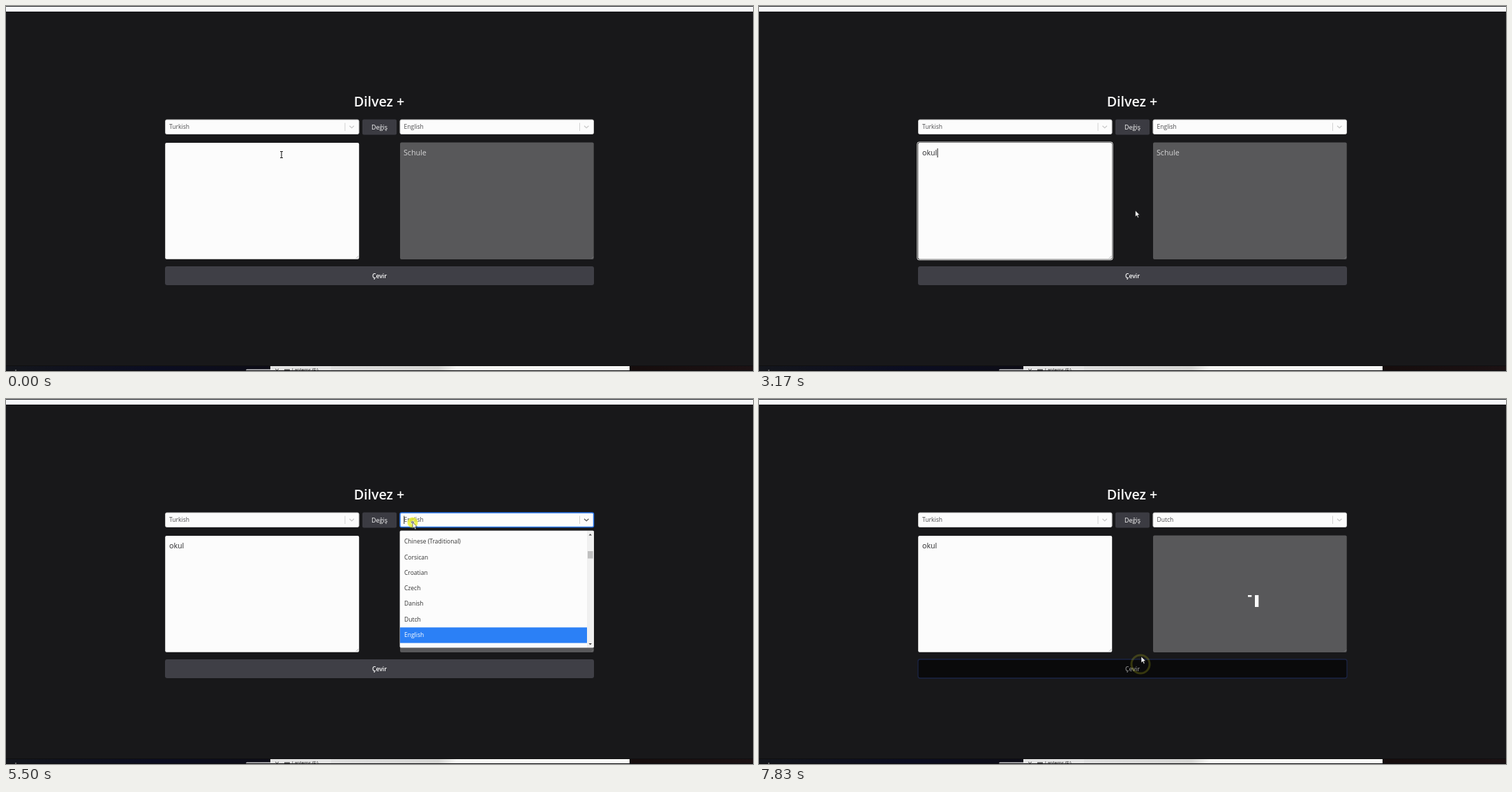
Write an HTML page that moves like this. It is 1071x523 px and loops after 8 s.

```html
<!DOCTYPE html>
<html lang="tr">
<head>
<meta charset="utf-8">
<title>Dilvez +</title>
<style>
html, body { margin: 0; width: 100%; height: 100%; overflow: hidden; background: #18181a; }
svg { display: block; width: 100%; height: 100%; }
text { font-family: "Open Sans", "Noto Sans", sans-serif; white-space: pre; }
.ui { font-size: 8.5px; fill: #4a4a4c; }
.area { font-size: 10.7px; }
.label { font-weight: 600; font-size: 8.6px; fill: #fff; text-anchor: middle; }
.chevron { fill: none; stroke: #c8c8c8; stroke-width: 1.2; }
</style>
</head>
<body>
<svg viewBox="0 0 1071 523" preserveAspectRatio="none">
  <defs>
    <linearGradient id="taskbar">
      <stop offset="0" stop-color="#14161c"/><stop offset=".2" stop-color="#0b0d22"/>
      <stop offset=".33" stop-color="#0d0d18"/><stop offset=".84" stop-color="#160d0d"/>
      <stop offset="1" stop-color="#1c1214"/>
    </linearGradient>
    <linearGradient id="panel">
      <stop offset="0" stop-color="#dedede"/><stop offset=".36" stop-color="#d6d6d4"/>
      <stop offset=".42" stop-color="#f6f6f4"/><stop offset="1" stop-color="#fafaf8"/>
    </linearGradient>
  </defs>

  <rect width="1071" height="523" fill="#18181a"/>
  <rect width="1071" height="1" fill="#26282c"/>
  <rect y="1" width="1071" height="7" fill="#f7f8fb"/>

  <rect y="515" width="1071" height="1" fill="#101011"/>
  <rect y="516" width="1071" height="7" fill="url(#taskbar)"/>
  <rect x="344" y="520.5" width="36" height="3" rx="1.5" fill="#c9c9cb"/>
  <rect x="379" y="516" width="87" height="6" fill="#e4e4e4"/>
  <rect x="466" y="516" width="428" height="6" fill="url(#panel)"/>
  <path d="M386 520l2.5 2 2.5-2" fill="none" stroke="#444"/>
  <rect x="399" y="520.5" width="8" height="2" fill="#555"/>
  <text x="410" y="524" font-size="6.6" fill="#222">Lanterns (F:)</text>
  <rect y="522" width="1071" height="1" fill="#0d0d10"/>
  <circle cx="14" cy="522" r="1" fill="#777"/>

  <text x="535" y="144" font-size="19.6" font-weight="600" fill="#fafafa" text-anchor="middle">Dilvez +</text>

  <g id="selects"></g>
  <rect id="swap" x="511" y="162.5" width="49" height="22" rx="2"/>
  <text class="label" x="535.5" y="177" style="font-weight:500;font-size:8.9px">Değiş</text>

  <rect id="areaRing" x="226.9" y="195" width="280.2" height="168.8" rx="2.5" fill="#111" stroke="#f4f4f4" stroke-width="1"/>
  <rect x="228.2" y="196" width="278" height="166.8" rx="2" fill="#fcfcfc"/>
  <path d="M502 361.5l3.5-3.5m-1 3.5l1-1" stroke="#999" stroke-width=".7"/>
  <text id="typed" class="area" x="234" y="214" fill="#2a2a2c"></text>
  <rect id="areaCaret" y="204" width="1" height="13" fill="#222"/>

  <rect x="565" y="195.6" width="277.7" height="167.4" rx="2" fill="#58585a"/>
  <path d="M840 361.5l2-2" stroke="#888" stroke-width=".7"/>
  <text id="result" class="area" x="570" y="214" fill="#d4d4d5"></text>
  <g id="loader" fill="#fbfbfb"></g>

  <rect id="submit" x="228" y="373" width="615" height="27" rx="3"/>
  <text id="submitText" class="label" x="535.5" y="389.5">Çevir</text>

  <g id="menu">
    <rect x="564.5" y="188.5" width="278.5" height="168" rx="2" fill="#d0d0d0"/>
    <rect x="565" y="189" width="277.5" height="167" rx="2" fill="#fcfcfc"/>
    <g id="options"></g>
    <rect x="833" y="189" width="9.5" height="167" fill="#f0f0f0"/>
    <rect x="834" y="218" width="7.6" height="10.5" fill="#c0c0c0"/>
    <path d="M835.5 195.4h4.4l-2.2-2.4zM835.5 350h4.4l-2.2 2.4z" fill="#444"/>
  </g>

  <circle id="pulse" fill="none" stroke="#e8ec1c"/>
  <g id="pointer">
    <path id="beam" d="M-2 -4.5h1.5l.5.6.5-.6h1.5M0 -4v8M-2 4.5h1.5l.5-.6.5.6h1.5" fill="none" stroke="#222" stroke-width="1.1"/>
    <path id="arrow" d="M0 0V9L2.1 7.1 3.6 10.4 5 9.8 3.6 6.6H6.4Z" fill="#fff" stroke="#111" stroke-width=".6"/>
    <path id="hand" d="M-1.5 1Q-.3 -.9 .9 1V4.3L5.2 5.5Q6.1 6 5.9 8L4.9 12.3H-.6L-4 7.8Q-3.6 6.2 -1.5 7.8Z" fill="#fff" stroke="#222" stroke-width=".6"/>
  </g>
</svg>

<script>
const NS = "http://www.w3.org/2000/svg";
const FPS = 6, LOOP = 8000;
const $ = id => document.getElementById(id);

function add(parent, tag, attrs, text) {
  const el = document.createElementNS(NS, tag);
  set(el, attrs);
  if (text) el.textContent = text;
  parent.appendChild(el);
  return el;
}
function set(el, attrs) {
  for (const k in attrs) el.setAttribute(k, attrs[k]);
}
const show = (el, on) => set(el, { visibility: on ? "visible" : "hidden" });
const within = (n, a, b) => n >= a && n <= b;

function makeSelect(x) {
  const g = $("selects");
  const box = add(g, "rect", { x, y: 163, width: 277.5, height: 20.5, rx: 2, fill: "#fcfcfc", stroke: "#ccc" });
  const value = add(g, "text", { x: x + 5.6, y: 176.3, class: "ui" });
  add(g, "rect", { x: x + 257, y: 167.5, width: 1, height: 11.5, fill: "#d2d2d2" });
  const chevron = add(g, "path", { d: `M${x + 264} 171.7l3.2 3 3.2-3`, class: "chevron" });
  return { box, value, chevron };
}
const from = makeSelect(228.5);
const to = makeSelect(565);
const toCaret = add($("selects"), "rect", { x: 570.3, y: 167.5, width: 1, height: 11.5, fill: "#333" });
from.value.textContent = "Turkish";

const ROW = 22.3, TOP = 193;
const options = ["Chinese (Traditional)", "Corsican", "Croatian", "Czech", "Danish", "Dutch", "English"]
  .map((name, i) => {
    const y = TOP + ROW * i;
    const row = add($("options"), "rect", { x: 565, y: y + .5, width: 268, height: ROW });
    add($("options"), "text", { x: 571, y: y + 14.2, class: "ui", style: `fill:${name === "English" ? "#fff" : "#333"}` }, name);
    return { name, row };
  });

const bars = [691, 701, 711].map(x => add($("loader"), "rect", { x, y: 281, width: 5.3 }));

// Pointer keys: step, x, y, shape
const path = [
  [0, 395, 213, "beam"], [12, 395, 213, "beam"], [14, 535, 185, "hand"],
  [16, 536, 182, "hand"], [17, 537, 200, "arrow"], [21, 542, 386, "hand"],
  [22, 542, 386, "arrow"], [25, 542, 386, "arrow"], [26, 543, 386, "hand"],
  [27, 543, 386, "hand"], [28, 543.5, 386.5, "hand"], [29, 552, 335, "arrow"],
  [32, 583, 176, "arrow"], [34, 583, 177, "arrow"], [38, 599, 316, "arrow"],
  [41, 599, 316, "arrow"], [43, 549, 378, "hand"], [44, 547, 380, "arrow"],
  [46, 547, 379, "arrow"], [47, 548, 369, "arrow"]
];
// Clicks: step, x, y
const clicks = [[1, 395, 213], [22, 542, 386], [32, 583, 177], [39, 599, 316], [44, 547, 380]];
// Ripple by age: radius, width, opacity
const ripple = [[2, 4, .92], [5, 5, .75], [9, 4, .42], [13, 3, .2]];

function pointerAt(n) {
  let i = path.length - 1;
  while (path[i][0] > n) i--;
  const a = path[i], b = path[i + 1] || a;
  const p = (n - a[0]) / (b[0] - a[0] || 1);
  return { x: a[1] + (b[1] - a[1]) * p, y: a[2] + (b[2] - a[2]) * p, shape: a[3] };
}

function drawPointer(n, at) {
  set($("pointer"), { transform: `translate(${at.x} ${at.y})` });
  for (const s of ["beam", "arrow", "hand"]) show($(s), s === at.shape);
  const hit = clicks.find(c => within(n, c[0], c[0] + 3));
  show($("pulse"), hit);
  if (hit) {
    const [r, w, o] = ripple[n - hit[0]];
    set($("pulse"), { cx: hit[1], cy: hit[2], r, "stroke-width": w, opacity: o });
  }
}

function drawTyping(n) {
  const count = n < 4 ? 0 : n < 10 ? 1 : Math.min(4, n - 8);
  const focused = within(n, 1, 21);
  $("typed").textContent = "okul".slice(0, count);
  show($("areaRing"), focused);
  show($("areaCaret"), focused);
  set($("areaCaret"), { x: 234.2 + (count ? $("typed").getComputedTextLength() : 0) });
}

function drawSelect(n, at) {
  const focused = within(n, 32, 43), open = within(n, 32, 39);
  to.value.textContent = n < 40 ? "English" : "Dutch";
  set(to.box, { stroke: focused ? "#2b78f0" : "#ccc", "stroke-width": focused ? 1.5 : 1 });
  to.chevron.style.stroke = focused ? "#555" : "";
  show(toCaret, within(n, 32, 35));
  show($("menu"), open);
  options.forEach((o, i) => {
    const hover = Math.floor((at.y - TOP) / ROW) === i;
    set(o.row, { fill: o.name === "English" ? "#2b80f6" : hover ? "#deebff" : "#fcfcfc" });
  });
}

function drawResult(n) {
  const busy = within(n, 24, 25) || n >= 46;
  $("result").textContent = busy ? "" : n < 24 ? "Schule" : "school";
  show($("loader"), busy);
  const heights = n === 25 || n === 47 ? [0, 2.6, 17] : [2.6, 17, 17];
  bars.forEach((b, i) => set(b, { height: heights[i] }));
  return busy;
}

function drawButtons(n, busy) {
  const focused = within(n, 22, 31) || n >= 44;
  const hover = within(n, 21, 28) || n >= 43;
  set($("submit"), {
    fill: busy ? "#0a0a0b" : !hover ? "#3f3f46" : focused ? "#18181a" : "#28282c",
    stroke: !focused ? "none" : busy ? "#1b2444" : "#2a5194",
    "stroke-width": 1.3
  });
  set($("submitText"), { opacity: busy ? .5 : 1 });
  set($("swap"), { fill: n === 16 ? "#18181a" : n === 15 || n === 17 ? "#28282c" : "#3b3b42" });
}

function draw(ms) {
  const n = Math.min(47, Math.floor(ms * FPS / 1000 + .03));
  const at = pointerAt(n);
  drawTyping(n);
  drawSelect(n, at);
  drawButtons(n, drawResult(n));
  drawPointer(n, at);
}

const start = performance.now();
function tick() {
  draw((performance.now() - start) % LOOP);
  requestAnimationFrame(tick);
}
tick();
</script>
</body>
</html>
```
